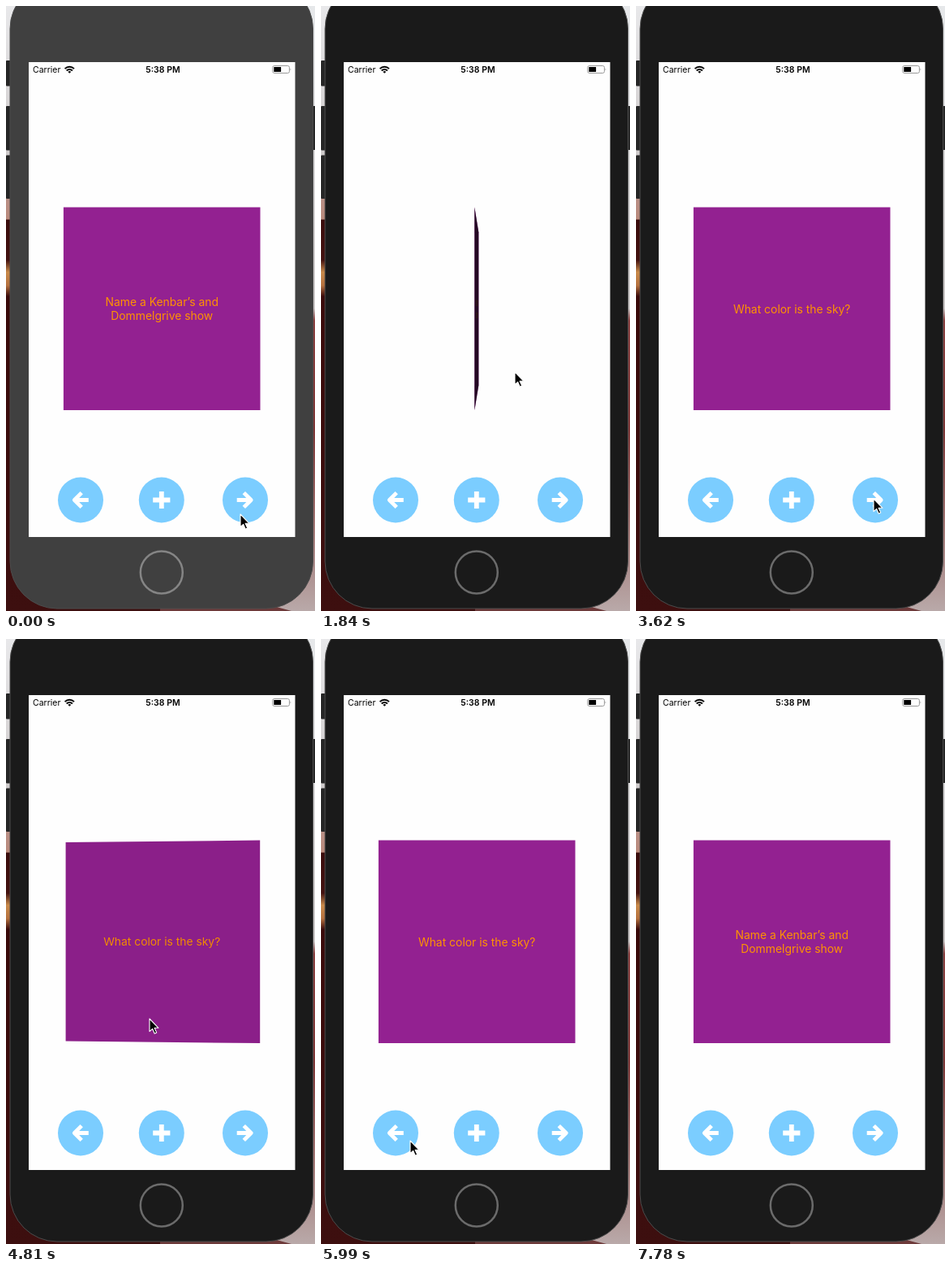
These frames come from a looping animation (381 px wide and 744 px high, 8000 ms). An HTML page:

```html
<!DOCTYPE html>
<html lang="en">
<head>
<meta charset="utf-8">
<title>Flash cards</title>
<style>
  html, body { margin: 0; width: 100%; height: 100%; overflow: hidden; }
  svg { display: block; width: 381px; height: 744px; }
  text { font-family: Inter, Roboto, sans-serif; }
  #label { font-size: 13.9px; fill: #ff9300; text-anchor: middle; }
  .status { font-size: 10.5px; fill: #000; }
  .icon { fill: none; stroke: #fff; stroke-width: 4.8; stroke-linejoin: round; }
</style>
</head>
<body>
<svg viewBox="0 0 381 744">
  <defs>
    <linearGradient id="wallLeft" x2="0" y2="1">
      <stop offset="0" stop-color="#e8e8ea"/>
      <stop offset=".3" stop-color="#c9c4c4"/>
      <stop offset=".32" stop-color="#b98f85"/>
      <stop offset=".352" stop-color="#b98a7c"/>
      <stop offset=".354" stop-color="#3a0c0c"/>
      <stop offset=".42" stop-color="#431210"/>
      <stop offset=".44" stop-color="#c98a4a"/>
      <stop offset=".462" stop-color="#b5713f"/>
      <stop offset=".48" stop-color="#3a0a0a"/>
      <stop offset="1" stop-color="#3d0f0f"/>
    </linearGradient>
    <linearGradient id="wallRight" x2="0" y2="1">
      <stop offset="0" stop-color="#e6e8ea"/>
      <stop offset=".5" stop-color="#c9c5c5"/>
      <stop offset=".52" stop-color="#8a4040"/>
      <stop offset=".7" stop-color="#7d3636"/>
      <stop offset=".86" stop-color="#a07472"/>
      <stop offset="1" stop-color="#b9a9a9"/>
    </linearGradient>
    <clipPath id="screen"><rect x="28" y="69" width="328.5" height="584"/></clipPath>
  </defs>

  <rect width="191" height="744" fill="url(#wallLeft)"/>
  <rect x="190" width="191" height="744" fill="url(#wallRight)"/>
  <path d="M190 744V738H330L352 744Z" fill="#6d3a3a"/>

  <g fill="#262626">
    <rect y="67" width="7" height="31.5" rx="1"/>
    <rect y="123" width="7" height="54.5" rx="1"/>
    <rect y="183.5" width="7" height="53.5" rx="1"/>
    <rect x="376" y="123" width="6" height="54"/>
  </g>
  <rect id="body" x="5" y="-30" width="373.5" height="771" rx="58" stroke="#4c4c4c"/>
  <circle id="home" cx="191.8" cy="696.5" r="26" fill="none" stroke-width="2.5"/>
  <rect x="28" y="69" width="328.5" height="584" fill="#fefefe"/>

  <text class="status" x="33" y="82">Carrier</text>
  <g fill="none" stroke="#000" stroke-width="1.9">
    <path d="M72.6 77.2a8 8 0 0 1 11.4 0"/>
    <path d="M74.7 79.5a5 5 0 0 1 7.2 0"/>
    <path d="M78.3 82.8l-1.9-1.9a2.7 2.7 0 0 1 3.8 0z" fill="#000" stroke="none"/>
  </g>
  <text class="status" x="193.5" y="82" text-anchor="middle" font-weight="600">5:38 PM</text>
  <rect x="328.8" y="73.5" width="20.6" height="9" rx="2" fill="none" stroke="#999"/>
  <rect x="330.3" y="75" width="8.8" height="6" fill="#000"/>
  <path d="M350.6 76.5q1.6 1.5 0 3z" fill="#888"/>

  <g clip-path="url(#screen)">
    <g id="card">
      <polygon id="face"/>
      <g id="label"></g>
      <polygon id="shade"/>
    </g>
  </g>

  <g fill="#7bcdff">
    <circle cx="92" cy="607.5" r="28"/>
    <circle cx="191.8" cy="607.5" r="28"/>
    <circle cx="295" cy="607.5" r="28"/>
  </g>
  <g class="icon">
    <path id="arrow" d="M93.2 598.6L84.3 607.5L93.2 616.4M85 607.5H101.8"/>
    <use href="#arrow" transform="matrix(-1 0 0 1 386.5 0)"/>
    <path d="M181.2 607.5H202.4M191.8 597V618" stroke-width="5.8"/>
  </g>

  <path id="cursor" d="M0 0V15.6L3.6 12.3L6.2 18.2L8.7 17.1L6.1 11.3H11Z"
        fill="#000" stroke="#fff" stroke-width="1.1" stroke-linejoin="round"/>
</svg>

<script>
const LOOP = 8000, FIRST_TICK = 499, TICK = 148.4;
const CENTER = { x: 192.2, y: 372.3 }, HALF_W = 121.3, HALF_H = 124.7;
const DEPTH = 0.14, SLIDE_WIDTH = 329;
const FLIP_LENGTH = 2, SLIDE_LENGTH = 1.9;

const cards = [
  { fill: '#932191', lines: ['Name a Kenbar’s and', 'Dommelgrive show'] },
  { fill: '#000', lines: ['Meadow Lane'] },
  { fill: '#932191', lines: ['What color is the sky?'] },
  { fill: '#000', lines: ['Blue'] },
];

// Starts are in ticks; a slide has a direction, a flip has none.
const moves = [
  { start: 3.85, from: 0, to: 1 },
  { start: 7.99, from: 1, to: 0 },
  { start: 17.19, from: 0, to: 2, dir: -1 },
  { start: 28.82, from: 2, to: 3 },
  { start: 32.13, from: 3, to: 2 },
  { start: 41.9, from: 2, to: 0, dir: 1 },
];

// Pointer stops: tick, x, y
const stops = [
  [0, 289, 625], [3.6, 239, 450], [9, 239, 450], [12, 293, 624], [13, 293, 606],
  [22, 293, 606], [26, 177, 467], [33, 177, 467], [37, 110, 617],
  [44, 110, 617], [48, 341, 737],
];

const el = id => document.getElementById(id);
const clamp = v => Math.min(1, Math.max(0, v));
const ease = v => { const p = clamp(v); return p * p * (3 - 2 * p); };

function cardPose(tick) {
  const move = moves.filter(m => m.start <= tick).pop();
  if (!move) return { card: 0, angle: 0, shift: 0 };
  const age = tick - move.start;
  if (!move.dir) {
    const angle = Math.PI * ease(age / FLIP_LENGTH);
    return { card: angle < Math.PI / 2 ? move.from : move.to, angle, shift: 0 };
  }
  const leaving = age < SLIDE_LENGTH;
  const part = leaving
    ? ease(age / SLIDE_LENGTH)
    : ease(age / SLIDE_LENGTH - 1) - 1;
  return { card: leaving ? move.from : move.to, angle: 0, shift: move.dir * SLIDE_WIDTH * part };
}

function pointerAt(tick) {
  const next = stops.findIndex(s => s[0] > tick);
  if (next === 0) return stops[0].slice(1);
  if (next < 0) return stops[stops.length - 1].slice(1);
  const [t0, x0, y0] = stops[next - 1], [t1, x1, y1] = stops[next];
  const p = ease((tick - t0) / (t1 - t0));
  return [x0 + (x1 - x0) * p, y0 + (y1 - y0) * p];
}

let shownCard = -1;
function setCard(index) {
  if (index === shownCard) return;
  shownCard = index;
  const { fill, lines } = cards[index];
  el('face').setAttribute('fill', fill);
  const top = 5.2 - (lines.length - 1) * 8.7;
  el('label').innerHTML = lines
    .map((line, i) => `<text y="${top + i * 17.4}">${line}</text>`).join('');
}

function drawCard({ card, angle, shift }) {
  setCard(card);
  const sin = Math.sin(angle), cos = Math.cos(angle);
  const shrink = (1 - DEPTH * sin) / (1 + DEPTH * sin);
  const near = HALF_W * cos, far = -near * shrink, farH = HALF_H * shrink;
  const points = `${near},${-HALF_H} ${near},${HALF_H} ${far},${farH} ${far},${-farH}`;
  el('face').setAttribute('points', points);
  el('shade').setAttribute('points', points);
  el('shade').setAttribute('opacity', 0.75 * sin);
  el('label').setAttribute('transform', `scale(${Math.abs(cos)} ${(1 + shrink) / 2})`);
  el('card').setAttribute('transform', `translate(${CENTER.x + shift} ${CENTER.y})`);
}

function render(time) {
  const tick = Math.floor((time - FIRST_TICK) / TICK);
  const active = tick >= 0;
  el('body').setAttribute('fill', active ? '#1a1a1a' : '#404040');
  el('home').setAttribute('stroke', active ? '#6b6b6b' : '#858585');
  drawCard(cardPose(tick));
  el('cursor').setAttribute('transform', `translate(${pointerAt(tick)})`);
  el('cursor').setAttribute('visibility', tick > 48 ? 'hidden' : 'visible');
}

const began = performance.now();
function loop() {
  render((performance.now() - began) % LOOP);
  requestAnimationFrame(loop);
}
loop();
</script>
</body>
</html>
```
